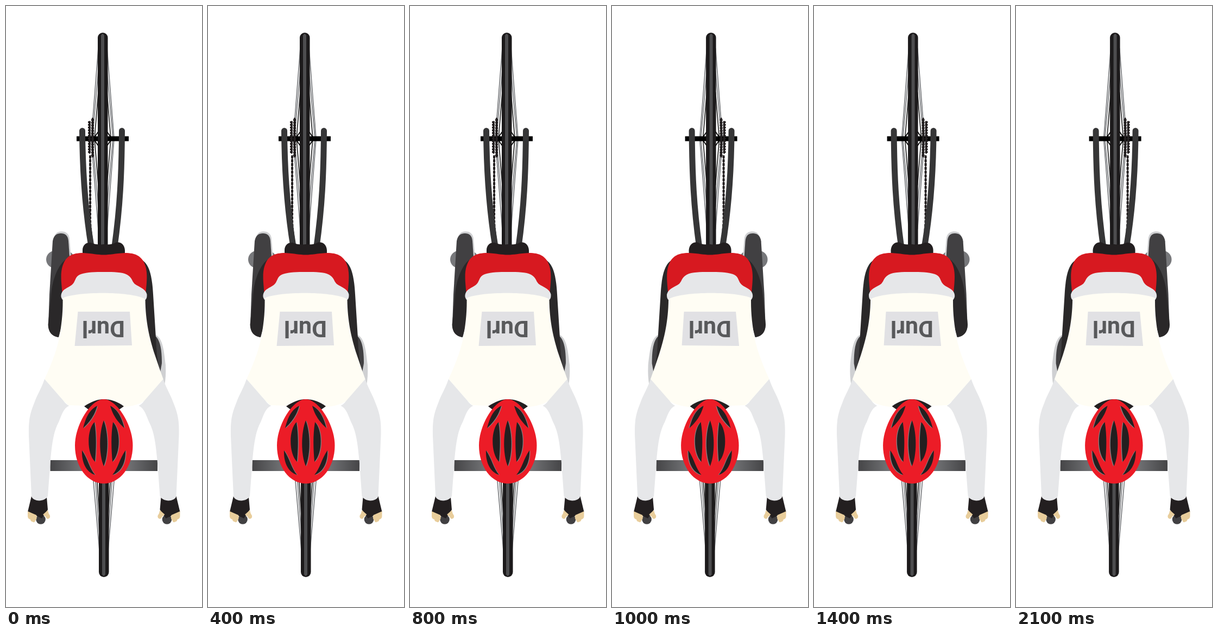
These frames come from a looping animation (361 by 1105 pixels, 2600 ms). An HTML page:

```html
<!DOCTYPE html>
<html lang="en">
<head>
<meta charset="utf-8">
<title>Cyclist</title>
<style>
html, body { margin: 0; width: 100%; height: 100%; overflow: hidden; background: #fff; }
svg { display: block; width: 361px; height: 1105px; }
text { font: bold 43px Roboto, Inter, sans-serif; text-anchor: middle; fill: #58595b; }
.ink { fill: #231f20; }
.pale { fill: #e6e7e9; }
.skin { fill: #e8cd9b; }
.line { fill: none; stroke-linecap: round; }
</style>
</head>
<body>
<svg viewBox="0 0 361 1105">
  <defs>
    <linearGradient id="metal">
      <stop offset="0" stop-color="#454547"/>
      <stop offset=".5" stop-color="#939598"/>
      <stop offset="1" stop-color="#454547"/>
    </linearGradient>
    <g id="arm">
      <circle cx="64" cy="944" r="8.800" fill="#414042"/>
      <path class="ink" d="M47 901Q60 911 75 903L77 926L66 942L40 930Z"/>
      <path class="skin" d="M40 929L56 936Q58 943 54 946Q53 951 48 948Q45 947 45 944Q40 943 40 938ZM68 935L77 927Q78 933 81 937Q82 942 77 943Q74 942 73 939Z"/>
      <path class="pale" d="M71 686L106 726Q110 732 116 735C105 740 102 754 97 765C88 782 85 802 82 834L77 901C72 912 51 912 47 902L42 790C41.500 764 43 752 52 730C58 713 64 706 71 686Z"/>
    </g>
    <g id="vents">
      <path d="M180 762C189 785 189 825 180 846C171 825 171 785 180 762Z"/>
      <path id="side" d="M163 765C149 778 148 822 164 838C166 815 167 790 163 765ZM168 735C154 742 147 756 142 776C153 766 163 754 168 735ZM140 817C139 838 147 857 164 862C154 851 151 833 140 817Z"/>
      <use href="#side" transform="translate(360) scale(-1 1)"/>
    </g>
  </defs>

  <g id="rider">
    <g id="spokes" class="line"></g>
    <rect x="130" y="239.500" width="96" height="9"/>
    <rect x="169" y="49" width="18.500" height="410" rx="9.200" fill="#1c1a1b"/>
    <path d="M175 54Q178 48 181 54V450H175Z" fill="#4d4d4f"/>
    <g class="line" stroke="#231f20">
      <path d="M159.500 207V277M154 213V270" stroke-width="3.500"/>
      <path d="M153.500 212V272M159.500 208V277" stroke-width="5" stroke-linecap="butt" stroke-dasharray="3 2"/>
      <path d="M155 275V390Q155 410 159 436" stroke-width="2"/>
      <path d="M155 275V390Q155 410 159 436" stroke-width="4" stroke-linecap="butt" stroke-dasharray="5 2"/>
    </g>
    <path class="line" d="M140.500 229.500C141 310 146 375 157 442M213.500 229.500C213 310 210 370 200 442" stroke="#363637" stroke-width="11"/>
    <path class="ink" d="M141 465V449C141 440 147 434 156 435Q167 440 180 438Q194 440 203 434.500C214 433 220 442 219 453V465Z"/>

    <rect x="74" y="450" width="52" height="32" rx="16" fill="#77787b"/>
    <path d="M84 490L88 430C89 419 94 414.500 102 414.500C111 414.500 116 419 117 428L122 490Z" fill="#cfd0d2"/>
    <path d="M86 432C88 421 94 418 101 418C109 418 114 422 115 432L119 490L96 609C84 607 78 599 78 586L80 530Z" fill="#414042"/>
    <path d="M112 465C96 474 85 505 83 530L77.500 586C78 600 85 607 97 609L110 560L120 470Z" fill="#2a2829"/>
    <path d="M274 604C289 609 291 635 294 660Q295 682 292 697L270 640Z" fill="#cfd0d2"/>
    <path d="M274 606C285 614 287 635 287 657L284 674L268 640Z" fill="#414042"/>
    <path d="M246 465C264 471 269 496 271 530L276 610Q277 645 283 671L262 645L245 500Z" fill="#2a2829"/>

    <rect x="81.500" y="835" width="197.500" height="20" fill="url(#metal)"/>
    <rect x="171" y="850" width="18.500" height="200" rx="9.200" fill="#1c1a1b"/>
    <path d="M177 850H183V1045Q180 1051 177 1045Z" fill="#4d4d4f"/>

    <path d="M104 530C100 495 101 484 107 471C113 460 122 454 142 454C160 455 168 457.500 180 457.500C192 457.500 200 455 219 454C239 454 248 460 254 471C260 484 261 495 257 530Z" fill="#d71920"/>
    <path class="pale" d="M104 540C101 536 101 533 102 529C105 520 113 519 121 513C129 507 126 497 138 493C150 489 165 489 180 489C200 489 213 489 223 494C234 500 231 508 240 513C249 518 257 521 259.500 530Q260 537 257 540Z"/>
    <path d="M104.500 537C130 525 230 524 256.500 539C257 580 264 610 274 641Q282 665 290 687L256 725C248 732 235 735 215 738L180 742L145 735L115 734L106 726L71 686Q90 645 97 615C103 585 105 560 104.500 537Z" fill="#fffdf4"/>
    <path d="M132.500 562H228L232 624L126.500 625Z" fill="#e1e1e4"/>
    <use href="#arm"/>
    <use href="#arm" transform="translate(360.500) scale(-1 1)"/>
    <path class="ink" d="M144 736C158 727 168 723 180 723C193 723 205 727 217 736L200 748H160Z"/>
    <path d="M180 723C204 723 233.500 770 233.500 808C233.500 847 210 878 180 878C150 878 127 847 127 808C127 770 156 723 180 723Z" fill="#ec1c27"/>
    <use href="#vents" fill="#8a8083" x="1.300" y=".4"/>
    <use href="#vents" class="ink"/>
  </g>
  <text id="label">Durl</text>
</svg>
<script>
const LOOP = 2600;
const CUTS = [200, 400, 600, 800, 1000, 1200, 1400, 1600, 2100];
const AXIS = 360.6;
const GREY = '#808285';
const DARK = '#333';
const rider = document.getElementById('rider');
const label = document.getElementById('label');

function spoke(x1, y1, x2, y2, stroke) {
  const line = document.createElementNS('http://www.w3.org/2000/svg', 'line');
  Object.entries({ x1, y1, x2, y2, stroke, 'stroke-width': 1.8 })
    .forEach(([key, value]) => line.setAttribute(key, value));
  document.getElementById('spokes').append(line);
}

for (const side of [-1, 1]) {
  const hub = offset => 178 + side * offset;
  const front = offset => 180 + side * offset;
  for (const end of [-1, 1]) {
    spoke(hub(21), 244, hub(8), 244 + end * 166, GREY);
    spoke(hub(19), 244, hub(8), 244 + end * 125, GREY);
    spoke(hub(15), 244, hub(8), 244 + end * 85, DARK);
    spoke(hub(17), 244, hub(8), 244 + end * 13, '#000');
  }
  spoke(front(20), 862, front(8), 1000, GREY);
  spoke(front(16), 862, front(8), 970, GREY);
  spoke(front(13), 862, front(8), 935, DARK);
}

let shown = null;
function draw() {
  const time = performance.now() % LOOP;
  const flipped = CUTS.filter(cut => cut <= time).length % 2 === 1;
  if (flipped !== shown) {
    shown = flipped;
    rider.setAttribute('transform', flipped ? `translate(${AXIS}) scale(-1 1)` : '');
    label.setAttribute('transform', `translate(${flipped ? 180.5 : 179.5} 579) rotate(180)`);
  }
  requestAnimationFrame(draw);
}
draw();
</script>
</body>
</html>
```
